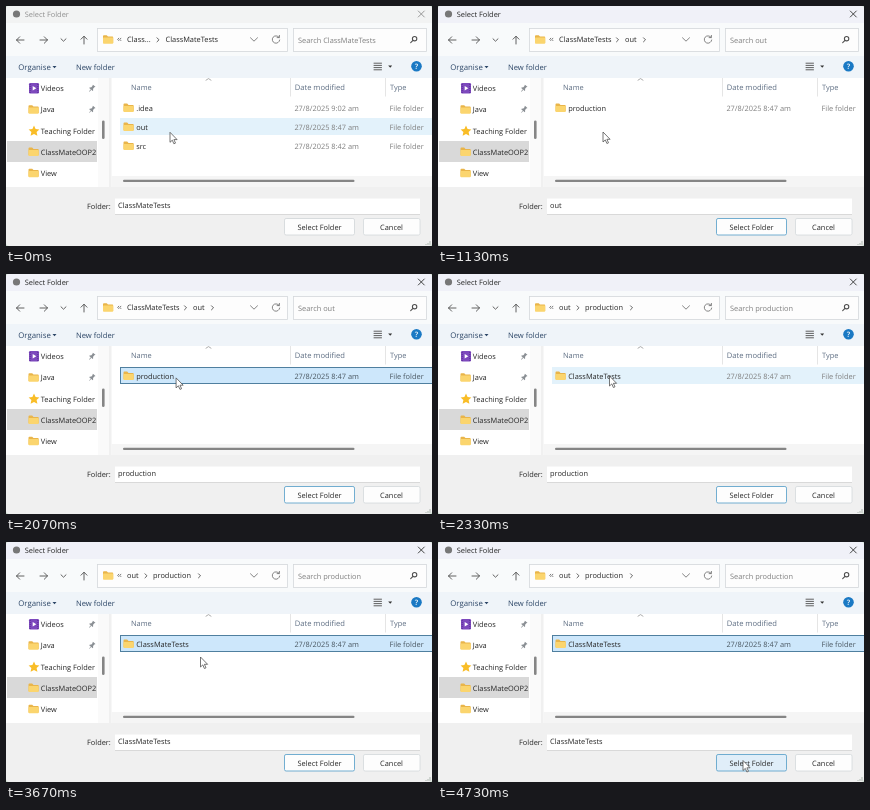
These frames come from a looping animation (426x240 px, 4790 ms). An HTML page:

```html
<!DOCTYPE html>
<html lang="en">
<head>
<meta charset="utf-8">
<title>Select Folder</title>
<style>
html, body { margin: 0; width: 100%; height: 100%; overflow: hidden; background: #c3d8c8; }
svg { display: block; width: 100vw; height: 100vh; }
text { font: 7.4px "Open Sans", "Noto Sans", sans-serif; fill: #262626; white-space: pre; text-rendering: geometricPrecision; }
.dim { fill: #7f7f7f; }
.soft { fill: #4a5761; }
.head { fill: #5d6d82; }
.bar { fill: #2b4566; font-size: 7.6px; }
.mid { text-anchor: middle; }
.line { fill: none; stroke: #505050; stroke-width: .9; stroke-linecap: round; stroke-linejoin: round; }
.box { fill: #fdfdfd; stroke: #d4d8db; stroke-width: .8; }
</style>
</head>
<body>
<svg viewBox="0 0 426 240" preserveAspectRatio="none">
  <defs>
    <clipPath id="win"><rect width="426" height="240" rx="3"/></clipPath>
    <clipPath id="side"><rect x="0" y="72" width="91" height="109"/></clipPath>
    <g id="folder">
      <path d="M0 1.2Q0 .3 .9 .3H3.7L5 1.6H9.4Q10.2 1.6 10.2 2.4V8H0Z" fill="#e9b54a"/>
      <rect y="2.6" width="10.2" height="6.2" rx=".8" fill="#fbd56e"/>
    </g>
    <g id="pin" fill="#8a8f94" transform="rotate(40)">
      <path d="M-1.6-3.4H1.6V-2.6H1.1V-.4L2.3 1V1.6H-2.3V1L-1.1-.4V-2.6H-1.6Z"/>
      <rect x="-.3" y="1.5" width=".6" height="2.6"/>
    </g>
  </defs>
  <g clip-path="url(#win)">
    <rect width="426" height="240" fill="#f0f0f0"/>
    <rect id="strip" width="426" height="17"/>
    <rect y="17" width="426" height="33" fill="#f8fafb"/>
    <rect y="50" width="426" height="22" fill="#eff4f9"/>
    <rect y="72" width="426" height="109" fill="#fff"/>
    <rect x="92" y="72" width="11" height="109" fill="#fafafa"/>
    <rect x="103" y="72" width="2.5" height="109" fill="#f0f0f0"/>
    <rect x="105.5" y="170" width="321" height="11" fill="#f5f5f5"/>

    <circle cx="10.5" cy="8" r="3.6" fill="#777"/>
    <text id="title" x="18.7" y="10.6">Select Folder</text>
    <path id="close" class="line" d="M412.3 5L418.3 11M418.3 5L412.3 11"/>

    <path class="line" d="M10.5 34H18M13.7 30.8L10.5 34L13.7 37.2M75 33.2L78 30.2L81 33.2M78 30.4V38"/>
    <path class="line" d="M34 34H41.5M38.3 30.8L41.5 34L38.3 37.2"/>
    <path class="line" d="M55 32.8L57.5 35.2L60 32.8"/>
    <rect class="box" x="91.5" y="22.5" width="190" height="23"/>
    <rect class="box" x="287.5" y="22.5" width="133" height="23"/>
    <use href="#folder" x="97" y="29"/>
    <path class="line" d="M112.8 32.2L111.7 33.4L112.8 34.6M114.9 32.2L113.8 33.4L114.9 34.6" style="stroke-width:.75"/>
    <g id="crumbs"></g>
    <path class="line" d="M244.5 31.8L248 35.2L251.5 31.8" style="stroke:#777"/>
    <path class="line" d="M273 31.3A3.7 3.7 0 1 0 273.7 34M273.4 29.4V31.6H271.1" style="stroke:#666;stroke-width:.8"/>
    <text id="search" class="dim" x="292" y="36.6"></text>
    <circle class="line" cx="408.6" cy="32.7" r="2.2" style="stroke-width:1.1"/>
    <path class="line" d="M407 34.4L404.7 36.7" style="stroke-width:1.1"/>

    <text class="bar" x="12.3" y="63.6" style="font-size:7.8px">Organise</text>
    <path d="M46.5 60H50.5L48.5 62.2Z" fill="#2b4566"/>
    <text class="bar" x="70" y="63.6">New folder</text>
    <path class="line" d="M368 57.2H375.5M368 59.4H375.5M368 61.6H375.5M368 63.8H375.5" stroke-linecap="butt"/>
    <path d="M382.2 59.5H386.2L384.2 61.7Z" fill="#333"/>
    <circle cx="410.5" cy="60.3" r="5.3" fill="#1a79c4"/>
    <text class="mid" x="410.5" y="63.1" style="fill:#fff;font-weight:600">?</text>

    <g id="tree" clip-path="url(#side)"></g>
    <rect x="96" y="114.5" width="2.6" height="18.5" rx="1.3" fill="#858585"/>

    <path class="line" d="M200 74.2L202.5 72.6L205 74.2" style="stroke:#8a8a8a;stroke-width:.7"/>
    <path d="M284.5 72V90.5M379.5 72V90.5" stroke="#e2e2e2" stroke-width=".9"/>
    <text class="head" x="125" y="84.2">Name</text>
    <text class="head" x="288.7" y="84.2" style="font-size:7.6px">Date modified</text>
    <text class="head" x="384" y="84.2">Type</text>
    <g id="list"></g>
    <rect x="117" y="173.8" width="231.5" height="2.3" rx="1.1" fill="#858585"/>

    <text x="81" y="203.4">Folder:</text>
    <rect x="109" y="192.5" width="305" height="16" fill="#fff"/>
    <path d="M109 208.5H414" stroke="#d2d2d2" stroke-width=".8"/>
    <text id="field" x="112" y="202.4"></text>
    <rect id="ok" x="278.5" y="212.5" width="70" height="16.5" rx="1.6" stroke-width=".9"/>
    <text class="mid" x="313.5" y="223.9">Select Folder</text>
    <rect class="box" x="357.5" y="212.5" width="56.5" height="16.5" rx="1.6"/>
    <text class="mid" x="385.5" y="223.9">Cancel</text>
    <path d="M424 235V239M422 237V239M420 238V239" stroke="#aeb8b0" stroke-width="1"/>
  </g>
  <path id="cursor" d="M0 0V10L2.3 7.9L3.9 11.5L5.5 10.8L3.9 7.3H7.1Z" fill="#fff" stroke="#4a4a4a" stroke-width=".75" stroke-linejoin="round"/>
</svg>
<script>
const LOOP = 4790;
const $ = id => document.getElementById(id);
const set = (el, attrs) => { for (const k in attrs) el.setAttribute(k, attrs[k]); };
const label = (x, y, s, cls = "") => `<text class="${cls}" x="${x}" y="${y}">${s}</text>`;
const folder = (x, y) => `<use href="#folder" x="${x}" y="${y}"/>`;
const chevron = x => `<path class="line" d="M${x - 1} 31.8L${x + 1} 33.8L${x - 1} 35.8"/>`;

// Folders visited: breadcrumb text and arrow positions, search name, rows.
const pages = [
  { from: 0, crumbs: [[121, "Class..."], [159.5, "ClassMateTests"]], arrows: [152], name: "ClassMateTests",
    rows: [[".idea", "9:02"], ["out", "8:47"], ["src", "8:42"]] },
  { from: 1130, crumbs: [[121, "ClassMateTests"], [187, "out"]], arrows: [179.5, 206.5], name: "out",
    rows: [["production", "8:47"]] },
  { from: 2200, crumbs: [[121, "out"], [147, "production"]], arrows: [140, 193.5], name: "production",
    rows: [["ClassMateTests", "8:47"]] }
];

// Clicks: [start, end, row, field text]
const picks = [
  [470, 1130, 1, "out"],
  [2070, 2200, 0, "production"],
  [3400, LOOP, 0, "ClassMateTests"]
];

// Pointer: [time, x, y]
const track = [
  [0, 164, 126.3], [600, 165, 126.3], [1200, 165, 126], [1800, 167.5, 122],
  [2030, 170, 104], [2330, 171.5, 102], [2650, 171.5, 103], [3130, 175, 119],
  [3360, 178, 105], [3460, 179, 105], [3670, 194.5, 115], [4350, 302, 217], [4730, 305, 218.5]
];

function pointer(t) {
  const i = track.findIndex(k => k[0] > t);
  if (i < 0) return track[track.length - 1].slice(1);
  const [a, b] = [track[i - 1], track[i]];
  const u = (t - a[0]) / (b[0] - a[0]);
  const e = u * u * (3 - 2 * u);
  return [a[1] + (b[1] - a[1]) * e, a[2] + (b[2] - a[2]) * e];
}

function row([name, time], i, picked, hover) {
  const y = 102.5 + 19 * i;
  const back = picked
    ? `<rect x="114.5" y="${y - 9}" width="313" height="16" fill="#cde7fb" stroke="#4f7f9f"/>`
    : hover ? `<rect x="114" y="${y - 9.5}" width="312" height="17" fill="#e3f2fb"/>` : "";
  const cls = picked ? "soft" : "dim";
  return back + folder(117.5, y - 5.2) + label(130.2, y + 2.7, name) +
    label(288.4, y + 2.7, `27/8/2025 ${time} am`, cls) + label(383.5, y + 2.7, "File folder", cls);
}

function buildTree() {
  const icons = {
    Videos: `<rect x="23" y="77" width="10" height="10.5" rx="1.2" fill="#7d49bd"/>
      <path d="M24.2 78V87M31.8 78V87" stroke="#5b2f95" stroke-dasharray="1 1"/><path d="M26.7 80V84.6L30.3 82.3Z" fill="#fff"/>`,
    "Teaching Folder": `<path d="M28 119.4L29.6 123L33.4 123.4L30.6 126L31.4 129.8L28 127.9L24.6 129.8L25.4 126L22.6 123.4L26.4 123Z" fill="#f9bd27"/>`
  };
  const items = ["Videos", "Java", "Teaching Folder", "ClassMateOOP2", "View"];
  $("tree").innerHTML = `<rect x="1" y="135" width="90" height="21" fill="#d9d9d9"/>` +
    items.map((s, i) => {
      const y = 82.3 + 21.2 * i;
      return (icons[s] || folder(22.5, y - 4.6)) + label(34.8, y + 2.9, s) +
        (i < 2 ? `<use href="#pin" transform="translate(86 ${y})"/>` : "");
    }).join("");
}

let last = "";
function draw(t) {
  const [x, y] = pointer(t);
  set($("cursor"), { transform: `translate(${x.toFixed(2)} ${y.toFixed(2)})` });

  const n = pages.filter(p => t >= p.from).length - 1;
  const page = pages[n];
  const pick = picks.find(p => t >= p[0] && t < p[1]);
  const hover = x > 114 && y < 170 ? Math.floor((y - 93) / 19) : -1;
  const over = x > 278 && x < 349 && y > 212 && y < 230;
  const key = [n, pick && pick[2], hover, over].join();
  if (key === last) return;
  last = key;

  const active = n > 0;
  $("title").style.fill = active ? "#262626" : "#8f8f8f";
  $("close").style.stroke = active ? "#333" : "#8f8f8f";
  set($("strip"), { fill: active ? "#f0f1f8" : "#f2f3f3" });
  $("crumbs").innerHTML = page.crumbs.map(c => label(c[0], 36.4, c[1])).join("") + page.arrows.map(chevron).join("");
  $("search").textContent = "Search " + page.name;
  $("field").textContent = pick ? pick[3] : page.name;
  $("list").innerHTML = page.rows.map((r, i) => row(r, i, pick && pick[2] === i, hover === i)).join("");
  set($("ok"), {
    fill: over ? "#e0eef9" : "#fdfdfd",
    stroke: active ? "#62a5cc" : "#d4d8db"
  });
}

buildTree();
const start = performance.now();
function tick() {
  draw((performance.now() - start) % LOOP);
  requestAnimationFrame(tick);
}
tick();
</script>
</body>
</html>
```
